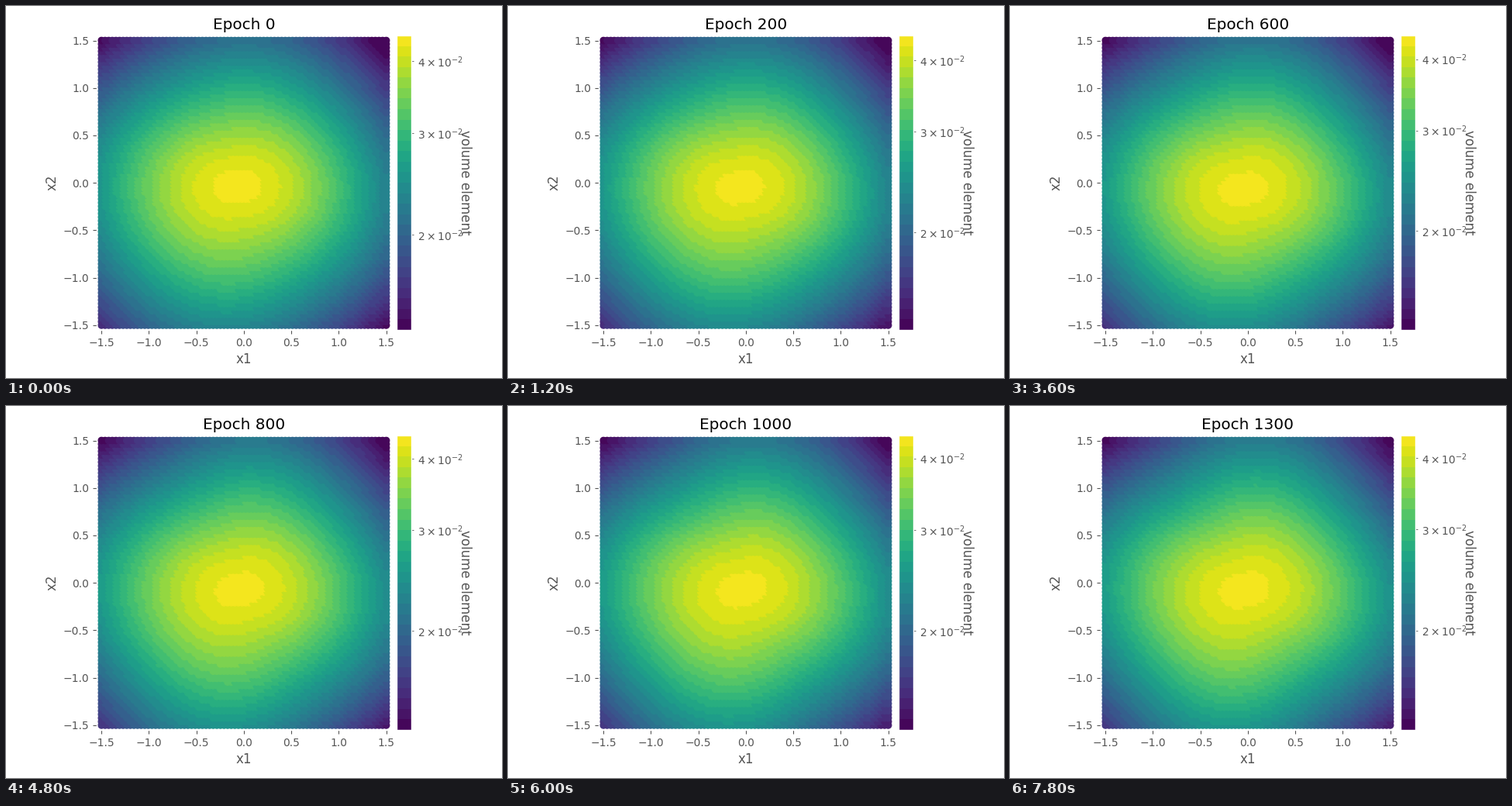
A matplotlib script that plays this animation: 640 by 480 pixels, repeating every 8 s.

```python
import numpy as np
import matplotlib.pyplot as plt
from matplotlib.animation import FuncAnimation
from matplotlib.colors import ListedColormap

W, H, DPI = 640, 480, 100
INTERVAL, FRAMES, HOLD = 100, 80, 3
LAST_STEP = (FRAMES - 1) // HOLD
BANDS, GRID, LIMIT = 28, 80, 1.55
TOP, BOTTOM = 38.4, 418
GREY = "#555555"
CMAP = ListedColormap(plt.get_cmap("viridis")((np.arange(BANDS) + .5) / BANDS))

side = np.linspace(-1.5, 1.5, GRID)
gx, gy = (g.ravel() for g in np.meshgrid(side, side))


def mix(a, b, p):
    return a + (b - a) * p


def volume(p):
    """Scaled log volume element: a rounded cone over a slowly turning oval."""
    eased = 1 - (1 - p) ** 2
    dx = gx - mix(-.055, -.02, eased)
    dy = gy - mix(-.02, -.055, eased)
    r, angle = np.hypot(dx, dy), np.arctan2(dy, dx)

    tilt = np.radians(mix(6, 14, p))
    oval = .22 / (1 + (r / .75) ** 2) * np.cos(2 * (angle - tilt))
    lean = .088 * r / (1 + r ** 2) * np.cos(angle - np.radians(237))
    corners = mix(.03, .055, p) * np.cos(4 * (angle + np.radians(8)))
    # Corners only show away from the centre.
    corners *= r ** 2 / (r ** 2 + .3)

    reach = r / (mix(1, 1.045, p) * (1 + oval + lean + corners))
    return np.clip(.98 - .66 * (np.hypot(1, reach / .982) - 1), 0, 1)


plt.rcParams.update({
    "font.family": "DejaVu Sans", "font.size": 10,
    "axes.edgecolor": "white", "axes.linewidth": 1,
    "axes.labelcolor": GREY, "axes.labelsize": 12, "axes.titlesize": 14.4,
    "xtick.color": GREY, "ytick.color": GREY,
})
fig = plt.figure(figsize=(W / DPI, H / DPI), dpi=DPI, facecolor="white")


def add_axes(left, right):
    return fig.add_axes([left / W, 1 - BOTTOM / H,
                         (right - left) / W, (BOTTOM - TOP) / H])


ax = add_axes(117.1, 496.7)
ticks = np.arange(-1.5, 1.6, .5)
ax.set(xlim=(-LIMIT, LIMIT), ylim=(-LIMIT, LIMIT), xticks=ticks, yticks=ticks,
       xlabel="x1", ylabel="x2")
title = ax.set_title("Epoch 0")
dots = ax.scatter(gx, gy, c=volume(0), cmap=CMAP, vmin=0, vmax=1)

bar = add_axes(504.4, 523.2)
bar.imshow(np.linspace(0, 1, BANDS)[:, None], cmap=CMAP, origin="lower",
           extent=(0, 1, 0, 1), aspect="auto", interpolation="nearest")
bar.set_xticks([])
bar.yaxis.tick_right()
bar.tick_params(axis="y", length=2, width=.6, pad=3.4)
fig.text(592 / W, 1 - 228 / H, "volume element", rotation=270, color=GREY,
         fontsize=12, ha="center", va="center")


def update(frame):
    step = frame // HOLD
    p = step / LAST_STEP
    title.set_text(f"Epoch {50 * step}")
    dots.set_array(volume(p))

    # The logarithmic scale slides as the value range changes.
    y4 = 71.3 - 4.3 * p ** .6
    y2 = 295.3 - 5.7 * (1 - np.exp(-5 * p))
    values = (2, 3, 4)
    heights = [y4 + (y2 - y4) * np.log2(4 / n) for n in values]
    bar.set_yticks([(BOTTOM - y) / (BOTTOM - TOP) for y in heights],
                   [rf"$\mathdefault{{{n}\times10^{{-2}}}}$" for n in values])
    return dots, title


anim = FuncAnimation(fig, update, frames=FRAMES, interval=INTERVAL,
                     repeat=True, repeat_delay=0, blit=False)
plt.show()
```
